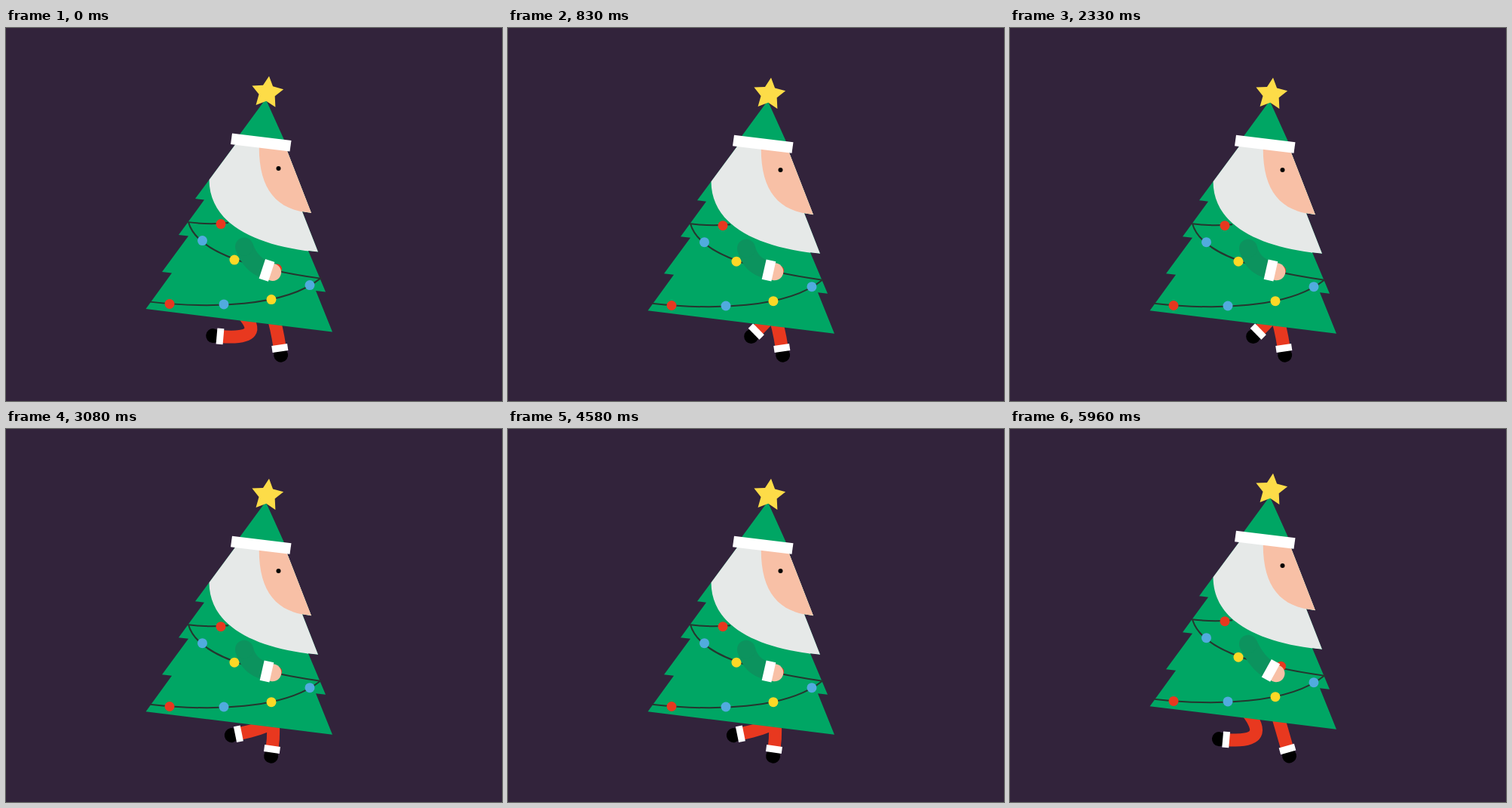
An HTML page for the animation above (6 s loop, 658x494 px).

```html
<!DOCTYPE html>
<html lang="en">
<head>
<meta charset="utf-8">
<title>Running tree</title>
<style>
  html, body { margin: 0; width: 100%; height: 100%; overflow: hidden; background: #32233b; }
  svg { display: block; width: 100%; height: 100%; }
</style>
</head>
<body>
<svg viewBox="0 0 658 494">
  <defs>
    <path id="outline" d="M304 157L336 145 372.500 164 405 247.500 393 245.500 414 299 401 297.500 424 352 411 350.500 433 405 185.500 374.500 220 327 207 325.500 242 278 229 276.500 263 230 251 228.500Z"/>
    <clipPath id="inside"><use href="#outline"/></clipPath>
    <circle id="bulb" r="6.500"/>
    <g id="boot">
      <circle cx="9.300" r="9.500"/>
      <rect x="-4.500" y="-10.500" width="9" height="21" fill="#fff"/>
    </g>
  </defs>
  <rect width="658" height="494" fill="#32233b"/>
  <g id="legs" fill="none" stroke="#e8381f" stroke-width="17"></g>
  <g id="tree">
    <use href="#outline" fill="#00a664"/>
    <path fill="none" stroke="#26362f" stroke-width="2" d="M295 260.500Q268 263 242 259.500C252 295 310 319 417 334C370 372 270 374 191 365"/>
    <g fill="#e8381f">
      <use href="#bulb" x="285" y="262"/>
      <use href="#bulb" x="359.500" y="321.500"/>
      <use href="#bulb" x="217" y="367.800"/>
    </g>
    <g fill="#51abde">
      <use href="#bulb" x="260.500" y="284"/>
      <use href="#bulb" x="403" y="343"/>
      <use href="#bulb" x="289" y="368.300"/>
    </g>
    <g fill="#fdd826">
      <use href="#bulb" x="303" y="309.500"/>
      <use href="#bulb" x="352" y="362"/>
    </g>
    <g clip-path="url(#inside)">
      <path fill="#e6e9e8" d="M300 140L260 203.500 269.500 203.500C270 264 335 292 416 299.500V140Z"/>
      <path fill="#f8c0a6" d="M336 150C333 214 357 244 406 247.500V150Z"/>
    </g>
    <path fill="#00a664" d="M344.500 96.500L370.500 154 303 153Z"/>
    <path fill="#fff" d="M300 142L378.500 151.500 376.500 166 298 156.500Z"/>
    <circle cx="361.500" cy="188.300" r="3"/>
    <polygon id="star" fill="#fddc48"/>
  </g>
  <path id="arm" fill="none" stroke="#0c935e" stroke-width="24"/>
  <circle id="shoulder" r="12" fill="#0c935e"/>
  <g id="hand">
    <circle cx="8" r="11.500" fill="#f8c0a6"/>
    <rect x="-6.500" y="-13.500" width="13" height="27" fill="#fff"/>
  </g>
</svg>
<script>
const FPS = 24, FRAMES = 144;
const STEP = 18, STRIDE = 36, PUSH = 21;
const LIFT = 20, REST = 0.3;
const $ = id => document.getElementById(id);
const radians = degrees => degrees * Math.PI / 180;

function set(node, attrs) {
  for (const key in attrs) node.setAttribute(key, attrs[key]);
}
function add(parent, tag, attrs = {}) {
  const node = document.createElementNS('http://www.w3.org/2000/svg', tag);
  set(node, attrs);
  return parent.appendChild(node);
}

set($('star'), {
  points: Array.from({ length: 10 }, (_, i) => {
    const angle = radians(6.5 + i * 36), r = i % 2 ? 11.2 : 22.1;
    return [346.5 + r * Math.sin(angle), 88 - r * Math.cos(angle)];
  }).join(' ')
});

const smooth = u => {
  u = Math.min(1, Math.max(0, u));
  return u * u * (3 - 2 * u);
};

const place = (x, y, dx, dy) =>
  `translate(${x} ${y}) rotate(${Math.atan2(dy, dx) * 180 / Math.PI})`;

// The body rests low, springs up, then drops quickly.
function liftAt(frame) {
  const phase = (frame + STEP - 1) % STEP;
  return LIFT * (smooth((phase - 5) / 8) - smooth((phase - 13) / 5));
}

// Foot travel: 0 is furthest forward, 1 furthest back.
function travelAt(phase) {
  const push = phase / PUSH;
  if (push < 1) return (push + smooth(push)) / 2;
  return ((STRIDE - phase) / (STRIDE - PUSH)) ** 2;
}

// The foot clears the ground around its forward swing.
function clearanceAt(phase) {
  const u = (phase - 25) / 22;
  return Math.abs(u) < 0.5 ? 22 * Math.cos(Math.PI * u) ** 2 : 0;
}

const legs = [21, 5].map(offset => ({
  offset,
  limb: add($('legs'), 'path'),
  boot: add($('legs'), 'use', { href: '#boot', fill: '#000', stroke: 'none' })
}));

function drawLeg({ offset, limb, boot }, frame, lift) {
  const phase = (frame + offset) % STRIDE;
  const travel = travelAt(phase);
  const x = 382 - 98 * travel, y = 424 - clearanceAt(phase);
  const shin = radians(Math.min(95, 155 * travel - 38));
  const reach = 28 + 38 * smooth((travel - 0.5) / 0.25);
  const dx = reach * Math.sin(shin), dy = -reach * Math.cos(shin);
  const hipX = 352 - 42 * smooth((travel - 0.7) / 0.25), hipY = 376 - lift;
  set(limb, { d: `M${hipX} ${hipY}Q${x + dx} ${y + dy} ${x} ${y}` });
  set(boot, { transform: place(x, y, -dx, -dy) });
}

function drawArm(lift) {
  const wristY = 321 - lift * lift / 45;
  const elbowX = 322 + 8 * (1 - Math.exp(-lift / 5)), elbowY = 315 - 0.7 * lift;
  const shoulderY = 292 - REST - lift;
  set($('arm'), { d: `M316 ${shoulderY}Q${elbowX} ${elbowY} 344 ${wristY - 1}` });
  set($('shoulder'), { cx: 316, cy: shoulderY });
  set($('hand'), { transform: place(346, wristY, 344 - elbowX, wristY - 1 - elbowY) });
}

function draw(ms) {
  const frame = Math.floor(ms * FPS / 1000 + 0.13) % FRAMES;
  const lift = liftAt(frame);
  legs.forEach(leg => drawLeg(leg, frame, lift));
  set($('tree'), { transform: `translate(0 ${-REST - lift})` });
  drawArm(lift);
}

let start;
function tick(now) {
  start ??= now;
  draw(now - start);
  requestAnimationFrame(tick);
}
draw(0);
requestAnimationFrame(tick);
</script>
</body>
</html>
```
